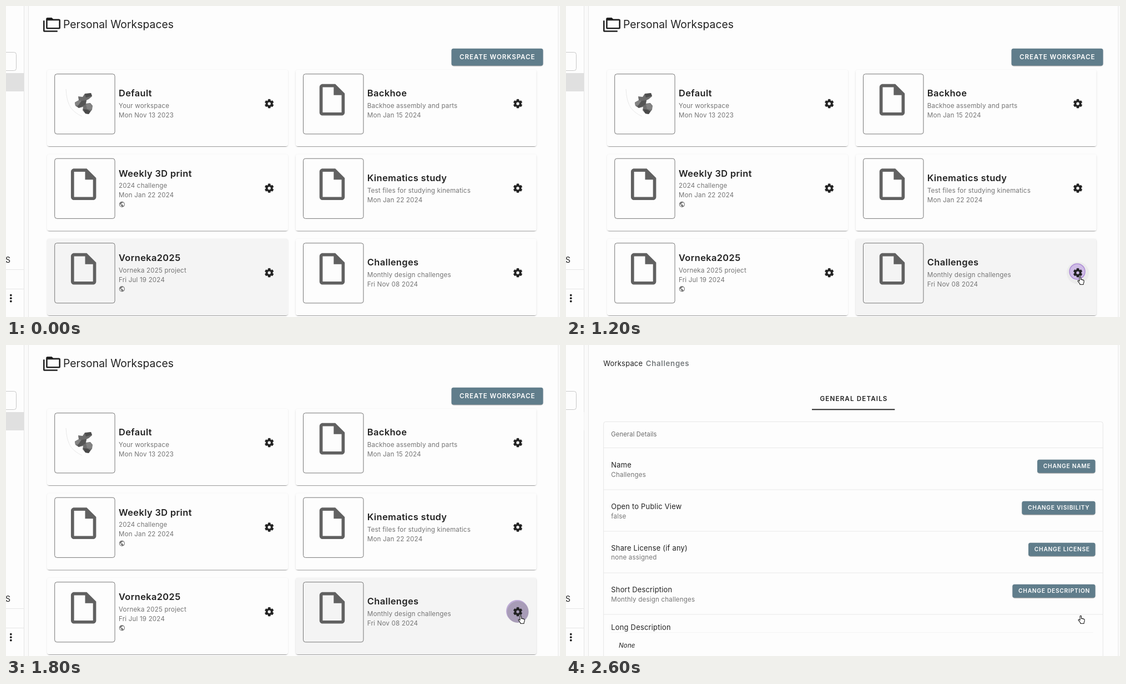
An HTML page for the animation above (3000 ms loop, 998 by 561 pixels).

```html
<!DOCTYPE html>
<html lang="en">
<head>
<meta charset="utf-8">
<title>Workspaces</title>
<style>
  html, body { margin: 0; width: 100%; height: 100%; overflow: hidden; background: #fdfdfd; }
  svg { display: block; width: 998px; height: 561px; }
  text { font-family: Inter, Roboto, sans-serif; fill: #222; white-space: pre; }
  .head { font-size: 19.4px; }
  .title { font-size: 16.4px; font-weight: 600; letter-spacing: .38px; }
  .sub { font-size: 11.6px; letter-spacing: .17px; fill: #757575; }
  .small { font-size: 11.2px; letter-spacing: .14px; fill: #686868; }
  .label { font-size: 12.9px; letter-spacing: .23px; }
  .strong { font-size: 13.3px; font-weight: 600; letter-spacing: .65px; fill: #757a7c; }
  .tab { font-size: 11.6px; font-weight: 600; letter-spacing: 1.15px; }
  .big { font-size: 11.6px; font-weight: 600; letter-spacing: .9px; fill: #fff; }
  .btn { font-size: 10.2px; font-weight: 600; letter-spacing: .75px; fill: #fff; }
  .serif { font-family: "Liberation Serif", "Noto Serif", serif; font-style: italic; font-size: 13.7px; }
  .serif.note { font-size: 12.3px; }
  .slant { font-size: 11.6px; font-style: italic; letter-spacing: .1px; }
</style>
</head>
<body>
<svg id="stage" viewBox="0 0 998 561" xmlns="http://www.w3.org/2000/svg">
  <defs>
    <filter id="tight" x="-5%" y="-20%" width="110%" height="140%"><feGaussianBlur stdDeviation=".5"/></filter>
    <filter id="wide" x="-5%" y="-20%" width="110%" height="140%"><feGaussianBlur stdDeviation="1.5"/></filter>
  </defs>
</svg>
<script>
const stage = document.getElementById('stage');
const LOOP = 3000, STEP = 200;
const INK = '#212121', SLATE = '#607d8b', PAPER = '#fdfdfd', HOVER = '#f4f4f4';

const FILE = 'M14 2H6c-1.1 0-2 .9-2 2V20c0 1.1.9 2 2 2H18c1.1 0 2-.9 2-2V8zM6 20V4h7v5h5v11z';
const FOLDERS = 'M22 4a2 2 0 0 1 2 2v10a2 2 0 0 1-2 2H6a2 2 0 0 1-2-2V4a2 2 0 0 1 2-2h6l2 2z' +
  'M2 6v14h18v2H2a2 2 0 0 1-2-2V6zM6 6v10h16V6z';
const GLOBE = 'M12 2a10 10 0 1 0 0 20a10 10 0 1 0 0-20zM11 19.9C7 19.4 4 16 4 12c0-.6.1-1.2.2-1.8L9 15v1' +
  'c0 1.1.9 2 2 2zM17.9 17.4c-.3-.8-1-1.4-1.9-1.4h-1v-3c0-.6-.4-1-1-1H8v-2h2c.6 0 1-.4 1-1V7h2' +
  'c1.1 0 2-.9 2-2v-.4c2.9 1.2 5 4 5 7.4 0 2.1-.8 4-2.1 5.4z';
const HAND = 'M4 1.6q1.2-1.4 2.4 0V6q1.2-.9 2 .4q1.2-.6 1.9.5q1.5-.3 1.7 1V10.5q0 1.6-1 2.6V15H4.8' +
  'V13.6L1.2 9.2q-.6-1.4.9-1.6q.8.1 1.9 1.3z';

function el(parent, tag, attrs = {}) {
  const node = document.createElementNS('http://www.w3.org/2000/svg', tag);
  set(node, attrs);
  return parent.appendChild(node);
}
function set(node, attrs) {
  for (const key in attrs) node.setAttribute(key, attrs[key]);
}
const group = parent => el(parent, 'g');
const rect = (parent, x, y, width, height, fill, more) =>
  el(parent, 'rect', { x, y, width, height, fill, ...more });
const line = (parent, x1, y1, x2, y2, stroke, more) =>
  el(parent, 'path', { d: `M${x1} ${y1}L${x2} ${y2}`, stroke, fill: 'none', ...more });
const circle = (parent, cx, cy, r, fill, more) =>
  el(parent, 'circle', { cx, cy, r, fill, ...more });
function text(parent, x, y, style, words, more) {
  const node = el(parent, 'text', { x, y, class: style, ...more });
  node.textContent = words;
  return node;
}
function icon(parent, d, x, y, scale, fill) {
  el(parent, 'path', { d, fill, 'fill-rule': 'evenodd', transform: `translate(${x} ${y}) scale(${scale})` });
}
function show(node, on) {
  node.style.display = on ? '' : 'none';
}

// Three-layer elevation under a raised surface.
function raised(parent, x, y, w, h, fill) {
  rect(parent, x + 1, y + 2, w - 2, h - 1, '#000', { rx: 4, opacity: .2, filter: 'url(#tight)' });
  rect(parent, x, y + 1, w, h, '#000', { rx: 4, opacity: .14, filter: 'url(#tight)' });
  rect(parent, x, y + .8, w, h, '#000', { rx: 4, opacity: .1, filter: 'url(#wide)' });
  return rect(parent, x, y, w, h, fill, { rx: 3.5 });
}

function gear(parent, cx, cy) {
  const points = [];
  for (let i = 0; i < 6; i++) {
    for (const [r, turn] of [[6, -22], [8.1, -13], [8.1, 13], [6, 22]]) {
      const a = (i * 60 + 30 + turn) * Math.PI / 180;
      points.push(`${(cx + r * Math.cos(a)).toFixed(2)} ${(cy + r * Math.sin(a)).toFixed(2)}`);
    }
  }
  const hole = `M${cx - 3} ${cy}a3 3 0 1 0 6 0a3 3 0 1 0-6 0z`;
  el(parent, 'path', {
    d: `M${points.join('L')}z${hole}`, fill: INK, 'fill-rule': 'evenodd',
    stroke: INK, 'stroke-width': .6, 'stroke-linejoin': 'round'
  });
}

function part(parent) {
  const shape = (d, fill) => el(parent, 'path', { d, fill });
  el(parent, 'path', { d: 'M108 150Q109 172 117 184Q125 194 137 199', fill: 'none', stroke: '#e2e2e2', 'stroke-width': .8 });
  shape('M124 174L131 170L130 163L138 164L142 158L153 157L155 163L149 168L145 170L144 176L152 175L156 180L155 187L149 195L143 194L138 188L139 182L131 184L125 180Z', '#6c6c6c');
  shape('M124 174L131 170L138 172L136 178L125 180Z', '#838383');
  shape('M142 159L153 157L155 162L144 165Z', '#4d4d4d');
  shape('M136 171L145 170L143 178L131 184L129 181Z', '#555');
  shape('M144 177L151 175L156 180L154 187L146 186Z', '#828282');
  shape('M139 186L147 187L152 190L149 195L143 194Z', '#494949');
}

function card(parent, x, y, title, sub, date, { globe, thumb } = {}) {
  const face = raised(parent, x, y, 434, 138, PAPER);
  rect(parent, x + 13.7, y + 7.7, 108.4, 108.2, 'none', { rx: 4, stroke: '#777', 'stroke-width': 1 });
  if (thumb) thumb(parent);
  else icon(parent, FILE, x + 31.6, y + 20.1, 2.84, '#616161');
  const top = y + (globe ? 40 : 48.3), left = x + 129;
  text(parent, left, top, 'title', title);
  text(parent, left, top + 20.8, 'sub', sub);
  text(parent, left, top + 37.7, 'sub', date);
  if (globe) icon(parent, GLOBE, x + 128.8, y + 84.3, .51, '#757575');
  return face;
}

function button(parent, x, y, words) {
  raised(parent, x, y, 953.5 - x, 24, SLATE);
  text(parent, x + 10.8, y + 15.4, 'btn', words);
}

// Frame shared by both pages
rect(stage, 0, 0, 998, 561, PAPER);
rect(stage, 33, 0, 7.5, 561, '#fafafa');
rect(stage, 995, 0, 3, 561, '#fafafa');
for (const x of [32.5, 40.5, 994.8]) line(stage, x, 0, x, 561, '#e6e6e6');
rect(stage, -10, 83.5, 28.5, 33, 'none', { rx: 4, stroke: '#c8c8c8' });
const band = rect(stage, 0, 121, 32.5, 33, '#e0e0e0');
for (const y of [475.5, 510.5]) line(stage, 0, y, 32, y, '#e6e6e6');
text(stage, -1, 463, 'label', 'S', { style: 'font-size:14px' });
for (const y of [521.7, 527.2, 532.7]) circle(stage, 8.8, y, 1.9, INK);

// Workspace list
const list = group(stage);
icon(list, FOLDERS, 67, 18.4, 1.29, INK);
text(list, 103, 40, 'head', 'Personal Workspaces');
raised(list, 802.5, 76.8, 165, 30.7, SLATE);
text(list, 817, 96, 'big', 'CREATE WORKSPACE');
const LEFT = 74, RIGHT = 521.8, ROWS = [115, 267.5, 420];
card(list, LEFT, ROWS[0], 'Default', 'Your workspace', 'Mon Nov 13 2023', { thumb: part });
card(list, RIGHT, ROWS[0], 'Backhoe', 'Backhoe assembly and parts', 'Mon Jan 15 2024');
card(list, LEFT, ROWS[1], 'Weekly 3D print', '2024 challenge', 'Mon Jan 22 2024', { globe: true });
card(list, RIGHT, ROWS[1], 'Kinematics study', 'Test files for studying kinematics', 'Mon Jan 22 2024');
const leaving = card(list, LEFT, ROWS[2], 'Vorneka2025', 'Vorneka 2025 project', 'Fri Jul 19 2024', { globe: true });
const entering = card(list, RIGHT, ROWS[2], 'Challenges', 'Monthly design challenges', 'Fri Nov 08 2024');
const halo = circle(list, 922, 481.5, 20, '#ebebeb');
const press = circle(list, 921, 479, 0, '#cfbce6', { stroke: '#ae8dd6', 'stroke-width': 1.5 });
const ripple = circle(list, 922, 481.5, 0, '#a79bb6');
for (const y of ROWS) for (const x of [LEFT, RIGHT]) gear(list, x + 400.2, y + 61.2);

// Workspace details
const details = group(stage);
text(details, 67.3, 38.2, 'label', 'Workspace');
text(details, 457.5, 101, 'tab', 'GENERAL DETAILS');
rect(details, 443, 115.4, 149.3, 1.9, INK);
rect(details, 67.7, 138.3, 899.6, 440, 'none', { rx: 4, stroke: '#e6e6e6' });
for (const y of [185.5, 261, 336, 411, 486]) line(details, 68, y, 967, y, '#e8e8e8');
text(details, 81.3, 165.4, 'small', 'General Details');
text(details, 81.3, 370.7, 'label', 'Share License (if any)');
text(details, 81.3, 387.4, 'sub', 'none assigned');
text(details, 81.3, 513.8, 'label', 'Long Description');
button(details, 833, 356.7, 'CHANGE LICENSE');
button(details, 804.3, 431.7, 'CHANGE DESCRIPTION');
const divider = line(details, 81, 518.8, 950, 518.8, '#f4f4f4');

const pending = group(details), loaded = group(details);
const fields = [
  ['Name', 'Challenges', 220.6],
  ['Open to Public View', 'false', 295.6],
  ['Short Description', 'Monthly design challenges', 445.7]
];
for (const [name, value, y] of fields) {
  text(pending, 81.3, y + 6.8, 'label', name);
  text(loaded, 81.3, y, 'label', name);
  text(loaded, 81.3, y + 17, 'sub', value);
}
for (const y of [221, 296]) text(pending, 953.5, y, 'serif', 'tbd', { 'text-anchor': 'end' });
text(pending, 95, 546.3, 'serif note', 'None');
text(loaded, 95, 546.3, 'slant', 'None');
text(loaded, 143.8, 38.2, 'strong', 'Challenges');
button(loaded, 849, 206.7, 'CHANGE NAME');
button(loaded, 821.3, 281.7, 'CHANGE VISIBILITY');

const hand = el(stage, 'path', { d: HAND, fill: '#fff', stroke: '#222', 'stroke-width': 1.1, 'stroke-linejoin': 'round' });

// Pointer stops, one per step from the second step on; the last one holds.
const STOPS = [[714, 471.5], [825, 484.5], [870, 478], [904, 486.5], [921, 488], [921, 487.5], [921, 487.5], [922, 487.5]];
const PRESS = { 6: 14, 7: 17, 8: 19.6, 9: 19.2 };

function draw(time) {
  const t = time % LOOP, step = Math.floor(t / STEP);
  const onList = step < 10, ready = t >= 2600;

  show(list, onList);
  show(details, !onList);
  set(leaving, { fill: step === 0 ? HOVER : step === 1 ? '#f9f9f9' : PAPER });
  set(entering, { fill: step === 0 ? PAPER : step === 1 ? '#f9f9f9' : HOVER });
  show(halo, step >= 4);
  set(press, {
    r: PRESS[step] || 0,
    cy: step > 7 ? 480 : 479,
    fill: step > 7 ? '#c6b6da' : '#cfbce6',
    stroke: step > 7 ? '#bba6d6' : '#ae8dd6'
  });
  show(press, step in PRESS);
  set(ripple, { r: step === 8 ? 14 : 19.4, opacity: step === 8 ? .6 : .95 });
  show(ripple, step === 8 || step === 9);

  show(pending, !ready);
  show(loaded, ready);
  show(divider, step >= 11);
  set(band, { fill: onList ? '#e0e0e0' : step === 10 ? '#e2e2e2' : ready ? PAPER : '#f4f4f4' });

  const [x, y] = STOPS[Math.min(Math.max(step - 1, 0), STOPS.length - 1)];
  set(hand, { transform: `translate(${x} ${y})` });
  show(hand, step > 0);
}

let start;
function tick(now) {
  start ??= now;
  draw(now - start);
  requestAnimationFrame(tick);
}
draw(0);
requestAnimationFrame(tick);
</script>
</body>
</html>
```
